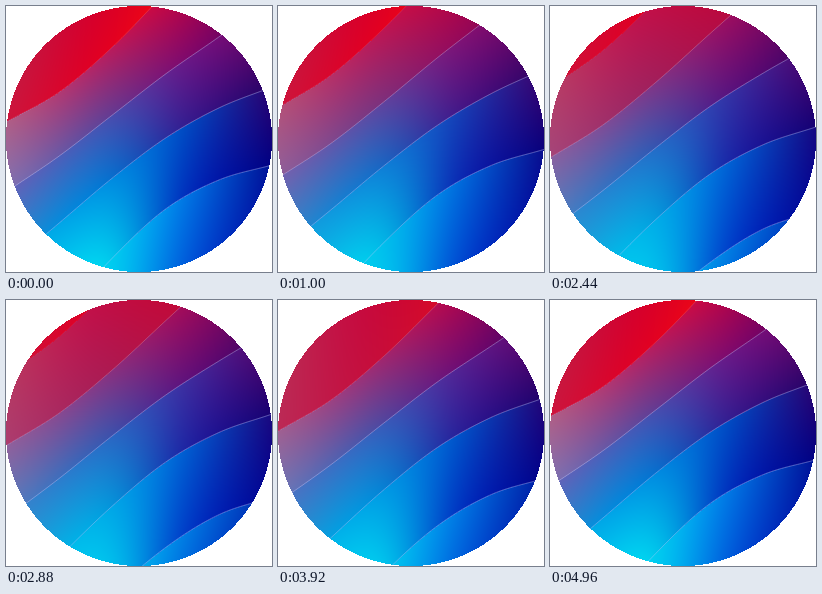
An HTML page with a canvas that plays this animation: 266x266 px, repeating every 5 s.

```html
<!DOCTYPE html>
<html lang="en">
<head>
<meta charset="utf-8">
<title>Drifting gradient waves</title>
<style>
html, body { margin: 0; width: 100%; height: 100%; overflow: hidden; background: #fff; }
canvas { display: block; width: 266px; height: 266px; }
</style>
</head>
<body>
<canvas id="stage" width="266" height="266"></canvas>
<script>
const SIZE = 266, LOOP = 5000, STEP = 40, LAST = 5;
const ctx = document.getElementById('stage').getContext('2d');
const image = ctx.createImageData(SIZE, SIZE);

// Wave heights at evenly spaced x, one row per whole phase
const waves = [
  [45, 0, -55, -110, -170, -230],
  [116, 86, 41, -14, -72, -130],
  [186, 150, 109, 68, 31, -8],
  [262, 217, 172, 132, 102, 81],
  [380, 312, 252, 203, 174, 159],
  [480, 412, 350, 308, 270, 249]
];

// Colours along the upper and lower edge of the band below each wave
const upper = [
  'be1e46 cd0032 d2001e d2001e',
  'af5f87 b42364 cd0037 96003c',
  '6464b9 4655b4 691987 82005f',
  '00b4e6 0096e4 004bc3 2d006e',
  '00dcf0 00d7f0 0078e4 000f96',
  '00dcf0 00d7f0 0082e1 003cc8'
];
const lower = [
  'cd143c e10023 f00a14 f00a14',
  '7d73b4 5f469b 7d0a6e 5a005a',
  '1496d7 007dd7 321e91 280064',
  '00e1f0 00def2 0032be 000082',
  '00e1f5 00e1f5 0050d7 0000a0',
  '00e1f5 00e1f5 0050d7 0000a0'
];

const clamp = (v, lo, hi) => Math.max(lo, Math.min(hi, v));
const mix = (a, b, f) => a + (b - a) * f;

// Catmull-Rom curve through evenly spaced values, f in 0..1
function spline(v, f) {
  const n = v.length - 1, i = Math.min(n - 1, Math.floor(f * n)), s = f * n - i;
  const b = v[i], c = v[i + 1];
  const a = i ? v[i - 1] : 2 * b - c;
  const d = i + 2 <= n ? v[i + 2] : 2 * c - b;
  return b + s / 2 * (c - a + s * (2 * a - 5 * b + 4 * c - d + s * (3 * (b - c) + d - a)));
}

const sample = v => Array.from({ length: SIZE + 1 }, (_, x) => spline(v, x / SIZE));
const channels = row => {
  const hex = row.split(' ');
  return [0, 2, 4].map(i =>
    sample(hex.map(h => parseInt(h.slice(i, i + 2), 16))).map(v => clamp(v, 0, 255)));
};

const heights = waves.map(sample);
const top3 = upper.map(channels), bottom3 = lower.map(channels);

function waveY(p, x) {
  const i = clamp(Math.floor(p), 0, LAST - 1);
  return mix(heights[i][x], heights[i + 1][x], p - i);
}

function tone(rows, p, x, ch) {
  const q = clamp(p, 0, LAST), i = Math.min(LAST - 1, Math.floor(q));
  return mix(rows[i][ch][x], rows[i + 1][ch][x], q - i);
}

function paintColumn(x, shift) {
  const dx = x + 0.5 - SIZE / 2;
  const half = Math.sqrt(SIZE * SIZE / 4 - dx * dx);
  const from = Math.round(SIZE / 2 - half), to = Math.round(SIZE / 2 + half);
  for (let k = 0; k <= LAST; k++) {
    const p = k - shift, y0 = waveY(p, x), y1 = waveY(p + 1, x);
    const start = k ? Math.max(from, Math.round(y0)) : from;
    const end = k < LAST ? Math.min(to, Math.round(y1)) : to;
    if (start >= end) continue;
    const a = [0, 1, 2].map(ch => tone(top3, p, x, ch));
    const b = [0, 1, 2].map(ch => tone(bottom3, p, x, ch));
    for (let y = start; y < end; y++) {
      const f = clamp((y - y0) / (y1 - y0), 0, 1), o = (y * SIZE + x) * 4;
      for (let ch = 0; ch < 3; ch++) image.data[o + ch] = mix(a[ch], b[ch], f);
      image.data[o + 3] = 255;
    }
  }
}

function strokeWave(p) {
  ctx.beginPath();
  for (let x = 0; x <= SIZE; x += 2) ctx.lineTo(x, waveY(p, x));
  ctx.strokeStyle = `rgba(190, 200, 255, ${clamp(0.22 * p - 0.04, 0.06, 0.4)})`;
  ctx.stroke();
}

function draw(ms) {
  const shift = Math.floor(ms % LOOP / STEP) * STEP / LOOP;
  for (let x = 0; x < SIZE; x++) paintColumn(x, shift);
  ctx.globalCompositeOperation = 'source-over';
  ctx.putImageData(image, 0, 0);
  ctx.globalCompositeOperation = 'source-atop';
  ctx.lineWidth = 1;
  for (let k = 1; k <= LAST; k++) strokeWave(k - shift);
}

const began = performance.now();
function tick() {
  draw(performance.now() - began);
  requestAnimationFrame(tick);
}
tick();
</script>
</body>
</html>
```
